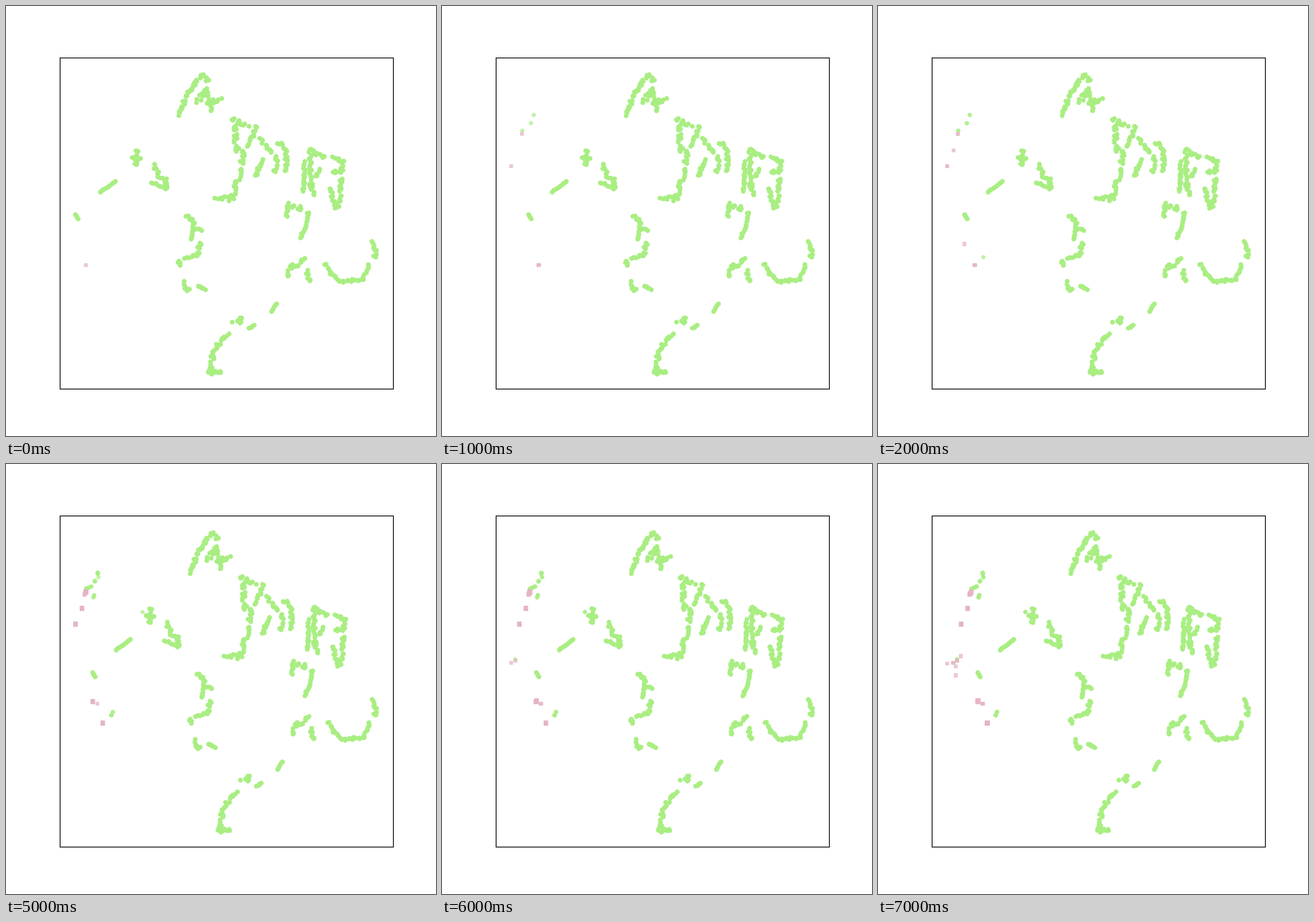
A matplotlib script for the animation above (8 s loop, 600x600 px).

```python
import numpy as np
import matplotlib.pyplot as plt
from matplotlib.animation import FuncAnimation
from matplotlib.colors import to_rgb

GREEN, PINK = to_rgb("#a9ee82"), to_rgb("#e4b5c5")
ALPHA = 0.65
RIGHT = 518.9
WIDTH = 422.8  # pixels between the outermost points
LEFTS = np.array([96.1] + [70.6] * 5 + [58.1, 48.9])
OLD = -20

rng = np.random.default_rng(4)


def band(spread, *path, gap=2.6):
    """Strew dots along a path, at most `spread` pixels off it."""
    pts = np.array(path, float)
    run = np.r_[0, np.cumsum(np.hypot(*np.diff(pts, axis=0).T))]
    at = np.linspace(0, run[-1], int(run[-1] / gap) + 2)
    xy = np.c_[np.interp(at, run, pts[:, 0]), np.interp(at, run, pts[:, 1])]
    return xy + rng.uniform(-spread, spread, xy.shape)


def trail(steps, start, end=None):
    """Dots from start to end that arrive at the given steps."""
    steps = np.array(steps)
    x, y = np.linspace(start, end or start, len(steps)).T
    x = RIGHT - (RIGHT - x) * (RIGHT - LEFTS[steps]) / WIDTH
    return np.c_[x, y, steps]


arch = [
    band(2.5, (239, 153), (252, 124), (273, 96), (281, 104)),
    band(3, (267, 133), (281, 115), (283, 138), (288, 147)),
    band(3, (285, 134), (299, 130)),
]
centre = [
    band(3, (314, 158), (337, 165)),
    band(3.5, (319, 165), (320, 195), (331, 211), (324, 240), (313, 271)),
    band(2, (338, 195), (350, 169)),
    band(3, (355, 183), (371, 206)),
    band(2, (357, 214), (348, 238)),
    band(2, (379, 190), (391, 200), (391, 231)),
    band(3, (379, 208), (376, 229)),
    band(2, (293, 269), (316, 267)),
]
square = [
    band(1.5, (417, 218), (415, 258)),
    band(2.5, (424, 202), (425, 245), (429, 264)),
    band(3, (424, 203), (446, 211)),
    band(2, (436, 229), (433, 238)),
    band(2, (457, 212), (470, 217), (468, 231), (456, 232)),
    band(2, (468, 240), (466, 272), (461, 282), (451, 255)),
]
elbow = [
    band(1.5, (394, 275), (392, 294)),
    band(3.5, (398, 282), (413, 282)),
    band(1.5, (422, 288), (417, 312), (411, 323)),
    band(2.5, (394, 377), (398, 362), (410, 361), (416, 350)),
    band(3, (419, 371), (425, 385)),
]
hook = [
    band(2, (445, 360), (463, 385), (497, 381), (507, 362)),
    band(2, (509, 330), (516, 340), (514, 352)),
]
tail = [
    band(3.5, (286, 512), (287, 482), (300, 470), (308, 457)),
    band(2, (284, 511), (300, 511)),
    band(3.5, (319, 444), (332, 437)),
    band(1, (340, 449), (346, 446)),
    band(1, (371, 426), (377, 416)),
]
west = [
    band(2.5, (183, 202), (182, 221)),
    band(2, (176, 213), (187, 211)),
    band(2, (206, 222), (213, 238), (222, 243), (224, 256), (204, 246)),
    band(1, (131, 260), (153, 245)),
    band(0.5, (97, 291), (101, 297)),
]
middle = [
    band(1.5, (252, 292), (263, 303), (258, 325)),
    band(2.5, (265, 313), (272, 313)),
    band(2, (271, 330), (267, 348), (250, 352)),
    band(1.5, (240, 355), (243, 362)),
    band(2.5, (248, 386), (249, 396), (256, 393)),
    band(1, (268, 390), (278, 396)),
]
settled = np.vstack(arch + centre + square + elbow + hook + tail + west + middle)

green = np.vstack([
    np.c_[settled, np.full(len(settled), OLD)],
    trail([1, 1], (128, 152), (124, 163.5)),
    trail([1, 3, 4], (112, 174), (119, 171)),
    trail([3, 5], (128, 153), (129, 158)),
    trail([4, 4], (123, 183), (122, 186)),
    trail([2, 4], (147, 350.5), (149, 346)),
    trail([5], (190.5, 206.5)),
    trail([6], (102, 272.5)),
])
pink = np.vstack([
    trail([0], (111, 361)),
    trail([1, 2], (96.1, 223), (105, 201)),
    trail([1, 3, 4], (111, 178), (109, 181.5)),
    trail([2, 3], (120, 331.5), (120.5, 330)),
    trail([5], (127, 334)),
    trail([6, 6], (96.1, 277), (102, 274)),
    trail([7, 7], (96.1, 278), (115, 267.5)),
    trail([7, 7], (108, 282), (108, 294.5)),
])

fig, ax = plt.subplots(figsize=(6, 6), dpi=100)
ax.set(xticks=[], yticks=[], ylim=(534, 72))
layers = [
    (ax.scatter(green[:, 0], green[:, 1], marker="o"), GREEN, green[:, 2]),
    (ax.scatter(pink[:, 0], pink[:, 1], marker="s"), PINK, pink[:, 2]),
]


def update(step):
    margin = 0.05 * (RIGHT - LEFTS[step])
    ax.set_xlim(LEFTS[step] - margin, RIGHT + margin)
    for dots, rgb, birth in layers:
        # Every step paints one more translucent coat, which also firms the rim.
        coats = np.maximum(step - birth + 1, 0)
        rgba = np.c_[np.tile(rgb, (len(birth), 1)), 1 - (1 - ALPHA) ** coats]
        dots.set_facecolor(rgba)
        dots.set_edgecolor(rgba)
        dots.set_sizes(9 + np.minimum(coats, 5))


anim = FuncAnimation(fig, update, frames=len(LEFTS), interval=1000, repeat=True,
                     repeat_delay=0, blit=False)
plt.show()
```
